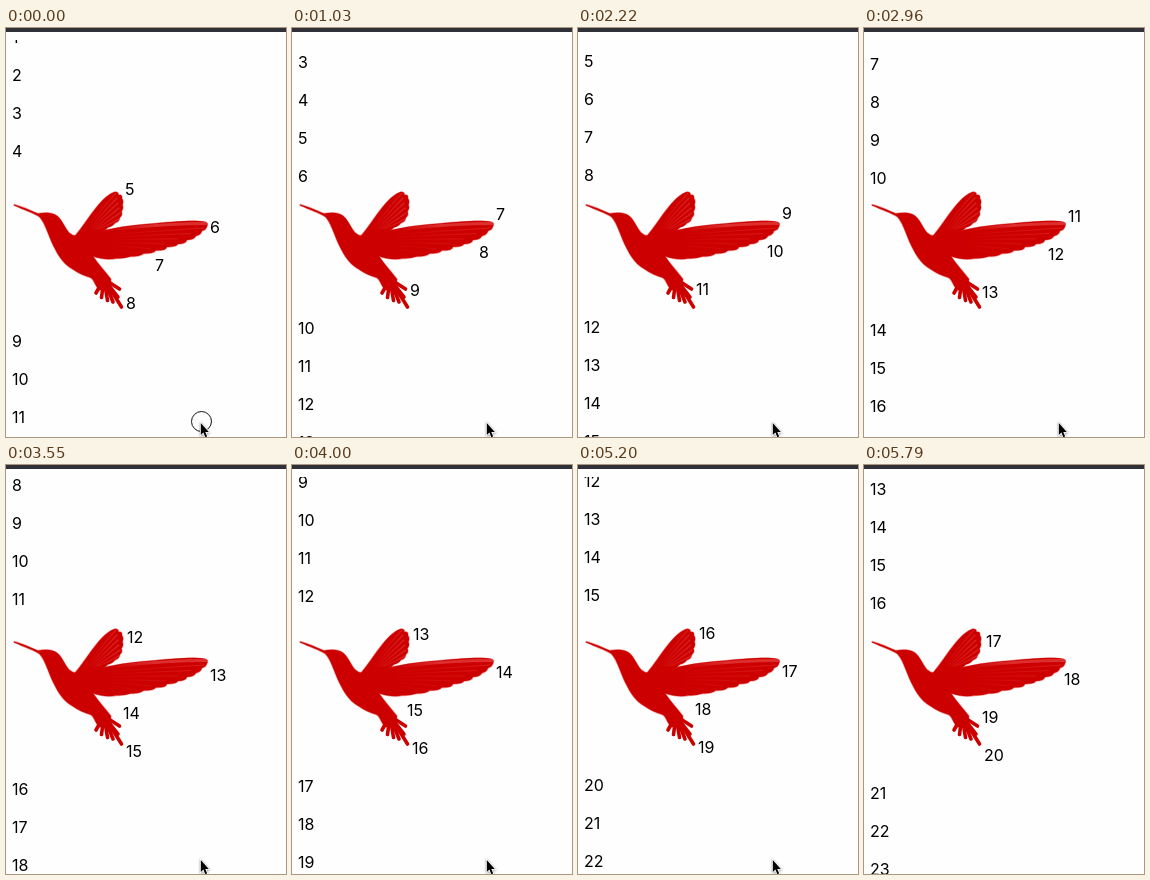
Recreate the animation shown at these times as an HTML page with a canvas. Size 280 by 409 pixels, loop 8.04 s.

```html
<!DOCTYPE html>
<html lang="en">
<head>
<meta charset="utf-8">
<title>Numbers flowing around a bird</title>
<style>
  html, body { margin: 0; width: 100%; height: 100%; overflow: hidden; background: #fefefe; }
  canvas { display: block; width: 280px; height: 409px; }
</style>
</head>
<body>
<canvas id="stage"></canvas>
<script>
const W = 280, H = 409, LOOP = 8040;
const STEP = 148.2, LAST = 39;
const LINE = 38, HALF = 13, LEFT = 6, CLIP_TOP = 12;

const canvas = document.getElementById('stage');
const ctx = canvas.getContext('2d');
const dpr = window.devicePixelRatio || 1;
canvas.width = W * dpr;
canvas.height = H * dpr;
ctx.scale(dpr, dpr);

// Scroll keys: step, offset in px, speed in px per step
const scrollKeys = [
  [0, 0, 4], [7, 51, 8.5], [15, 128, 11.5], [20, 201, 14],
  [27, 296, 14.5], [31, 361, 12], [39, 441, 2]
];

// Right edge of the float area: y, x
const edge = [
  [164, 116], [170, 118], [176, 120], [190, 122], [193, 190], [195, 204],
  [198, 204], [201, 200], [205, 195], [210, 189], [213, 184], [224, 149],
  [232, 112], [240, 104], [258, 115], [262, 118], [277, 118], [279, 120],
  [281, 118], [283, 116]
];

const body = new Path2D('M8 176.5C17 178.5 25 183 32 185.5C38 184.5 45 184.5 49 186.5C56 190 58 199 63 204.5Q66 207.5 70 208L92 205L100 222L87 228C92 236 99 243 105 251L104 262L93 262C88 256 88 251 84 249.5C78 248 72 245 67 241.5C55 235 50 223 46 215C42 206 39 195 33.5 189C28 185 18 182 8 177.5Z');
const upperWing = new Path2D('M68 209C76 200 83 188 91 178.5C97 171 104 165 109 163.8Q113 164 112.5 167Q116.5 166 116 170.5Q118 173 116.5 177Q118 180 115.5 183.5Q117 187 114 189.5Q113 194 109 195Q107 198 102 199.5Q98 204 88 206Z');
const longWing = new Path2D('M86 206C105 199.5 125 197 150 195.3C170 193.5 188 191.7 199 193.8Q203 195 201 198.5Q200 202 196 203Q195 207 190 208Q188 212 181 212Q180 216 172 216Q171 219 161 219Q160 223 150 222.5Q147 226 138 225.5Q133 229 125 228.5Q118 231 110 230.5Q100 233 86 228Z');
const tailTips = [[90, 265], [95.5, 269.5], [101.5, 272.5], [107, 274], [115.5, 279], [112, 269], [113.5, 261]];
const arrow = new Path2D('M194.8 395V407L197.4 404.6L199.3 409.2L201.2 408.4L199.3 404H202.8Z');

const mix = (a, b, u) => a + (b - a) * u;

function scrollAt(k) {
  let i = 0;
  while (i < scrollKeys.length - 2 && k >= scrollKeys[i + 1][0]) i++;
  const [k0, p0, v0] = scrollKeys[i], [k1, p1, v1] = scrollKeys[i + 1];
  const d = k1 - k0, u = (k - k0) / d, w = 1 - u;
  return w * w * (1 + 2 * u) * p0 + u * w * w * d * v0
    + u * u * (3 - 2 * u) * p1 - u * u * w * d * v1;
}

function edgeAt(y) {
  for (let i = 1; i < edge.length; i++) {
    const [y0, x0] = edge[i - 1], [y1, x1] = edge[i];
    if (y >= y0 && y <= y1) return mix(x0, x1, (y - y0) / (y1 - y0));
  }
  return LEFT;
}

function lineStart(y) {
  let x = LEFT;
  for (let d = -HALF; d <= HALF; d++) x = Math.max(x, edgeAt(y + d));
  return Math.round(x);
}

function streak(x0, y0, cx, cy, x1, y1, color, width) {
  ctx.beginPath();
  ctx.moveTo(x0, y0);
  ctx.quadraticCurveTo(cx, cy, x1, y1);
  ctx.strokeStyle = color;
  ctx.lineWidth = width;
  ctx.stroke();
}

// Pale tint that fades in from a feather's root to its tip
function fade(x0, x1, alpha) {
  const g = ctx.createLinearGradient(x0, 0, x1, 0);
  g.addColorStop(0, 'rgba(235,85,85,0)');
  g.addColorStop(1, `rgba(235,85,85,${alpha})`);
  return g;
}

function drawBird() {
  ctx.lineCap = ctx.lineJoin = 'round';
  for (const [x, y] of tailTips) streak(98, 251, mix(98, x, 0.5), mix(251, y, 0.5), x, y, '#cd0000', 3.6);

  // A faint rim softens the silhouette
  ctx.fillStyle = '#cd0000';
  ctx.strokeStyle = 'rgba(205,0,0,.35)';
  ctx.lineWidth = 1.3;
  for (const part of [body, upperWing, longWing]) {
    ctx.fill(part);
    ctx.stroke(part);
  }

  ctx.save();
  ctx.clip(upperWing);
  const upperTint = fade(80, 112, 0.45);
  for (let i = 0; i < 6; i++) {
    streak(82 + i * 2, 201, 90 + i * 2.4, 187 + i * 2, 110 + i, 165 + i * 5, upperTint, 1.1);
  }
  ctx.restore();

  ctx.save();
  ctx.clip(longWing);
  streak(112, 201, 160, 195.5, 202, 195.5, fade(105, 150, 0.55), 3);
  const lowerTint = fade(100, 190, 0.32);
  for (let i = 0; i < 7; i++) {
    const u = i / 6;
    streak(100, 207 + i * 2.6, mix(150, 110, u), mix(203, 226, u),
      mix(198, 118, u), mix(200, 230, u) + 4 * u * (1 - u), lowerTint, 1);
  }
  ctx.restore();
}

function drawNumbers(scroll) {
  ctx.save();
  ctx.beginPath();
  ctx.rect(0, CLIP_TOP, W, H - CLIP_TOP);
  ctx.clip();
  ctx.fillStyle = '#000';
  ctx.font = '16px Inter, Roboto, sans-serif';
  ctx.textBaseline = 'alphabetic';
  for (let n = 1; n <= 24; n++) {
    const y = Math.round(LINE * n - 29 - scroll);
    if (y > -10 && y < H + 10) ctx.fillText(n, lineStart(y), y + 6);
  }
  ctx.restore();
}

function drawPointer(pressed) {
  if (pressed) {
    ctx.beginPath();
    ctx.arc(195.5, 393.5, 10, 0, Math.PI * 2);
    ctx.strokeStyle = '#111';
    ctx.lineWidth = 1;
    ctx.stroke();
  }
  ctx.save();
  ctx.lineJoin = 'miter';
  ctx.strokeStyle = '#fff';
  ctx.lineWidth = 1.6;
  ctx.shadowColor = 'rgba(0,0,0,.5)';
  ctx.shadowBlur = 2 * dpr;
  ctx.shadowOffsetY = 0.5 * dpr;
  ctx.stroke(arrow);
  ctx.restore();
  ctx.fillStyle = '#000';
  ctx.fill(arrow);
}

function draw(now) {
  const k = Math.min(LAST, Math.floor((now % LOOP + 8) / STEP));
  ctx.fillStyle = '#fefefe';
  ctx.fillRect(0, 0, W, H);
  drawBird();
  drawNumbers(scrollAt(k));
  ctx.fillStyle = '#303038';
  ctx.fillRect(0, 0, W, 4);
  if (k < LAST) drawPointer(k === 0);
}

let start = null;
function tick(now) {
  if (start === null) start = now;
  draw(now - start);
  requestAnimationFrame(tick);
}
draw(0);
requestAnimationFrame(tick);
</script>
</body>
</html>
```
